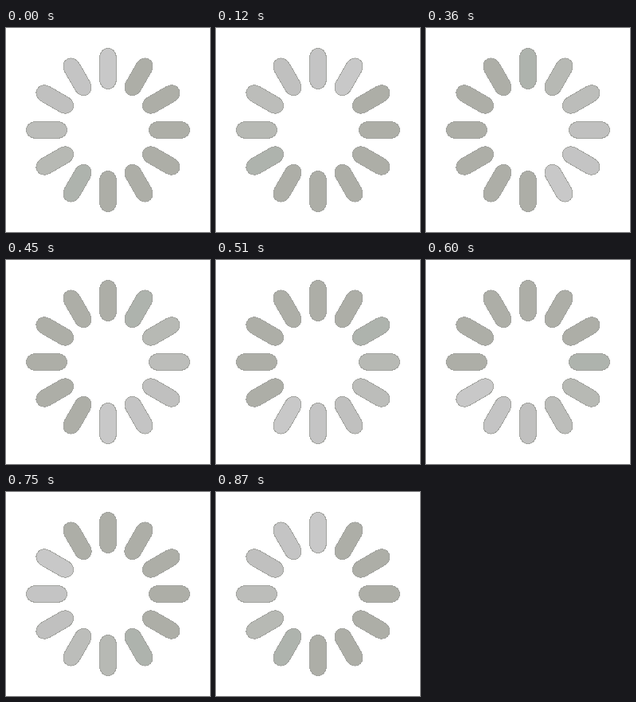
An HTML page for the animation above (900 ms loop, 256 px wide and 256 px high).

```html
<!DOCTYPE html>
<html lang="en">
<head>
<meta charset="utf-8">
<title>Spinner</title>
<style>
  html, body { margin: 0; width: 100%; height: 100%; overflow: hidden; background: #fff; }
  svg { display: block; width: 100vw; height: 100vh; }
  rect { stroke: #a3a4a0; stroke-width: 1; shape-rendering: crispEdges; }
</style>
</head>
<body>
<svg id="stage" viewBox="0 0 256 256"></svg>
<script>
  const LOOP = 900, COUNT = 12;
  // Bar colour by steps since it was lit; older bars keep the last one
  const FADE = ['#c8c8c8', '#c4c4c4', '#c0c0bf', '#bcbdba', '#b7b9b4', '#aeb3ad', '#adaea7'];
  const stage = document.getElementById('stage');

  const bars = Array.from({ length: COUNT }, (_, i) => {
    const bar = document.createElementNS(stage.namespaceURI, 'rect');
    const attrs = {
      x: 117.5, y: 25.5, width: 21, height: 51, rx: 10.5, ry: 12,
      transform: `rotate(${i * 360 / COUNT} 128 128)`
    };
    for (const name in attrs) bar.setAttribute(name, attrs[name]);
    return stage.appendChild(bar);
  });

  // Two steps every 150 ms, the second after 60 ms; the last turn comes 30 ms early
  const headAt = t => t >= 870 ? 0 : 2 * Math.floor(t / 150) + (t % 150 >= 60 ? 1 : 0);

  let shown = -1;
  function draw(t) {
    const head = headAt(t % LOOP);
    if (head === shown) return;
    shown = head;
    bars.forEach((bar, i) => {
      const age = (head - i + COUNT) % COUNT;
      bar.setAttribute('fill', FADE[Math.min(age, FADE.length - 1)]);
    });
  }

  const start = performance.now();
  function tick() {
    draw(performance.now() - start);
    requestAnimationFrame(tick);
  }
  tick();
</script>
</body>
</html>
```
